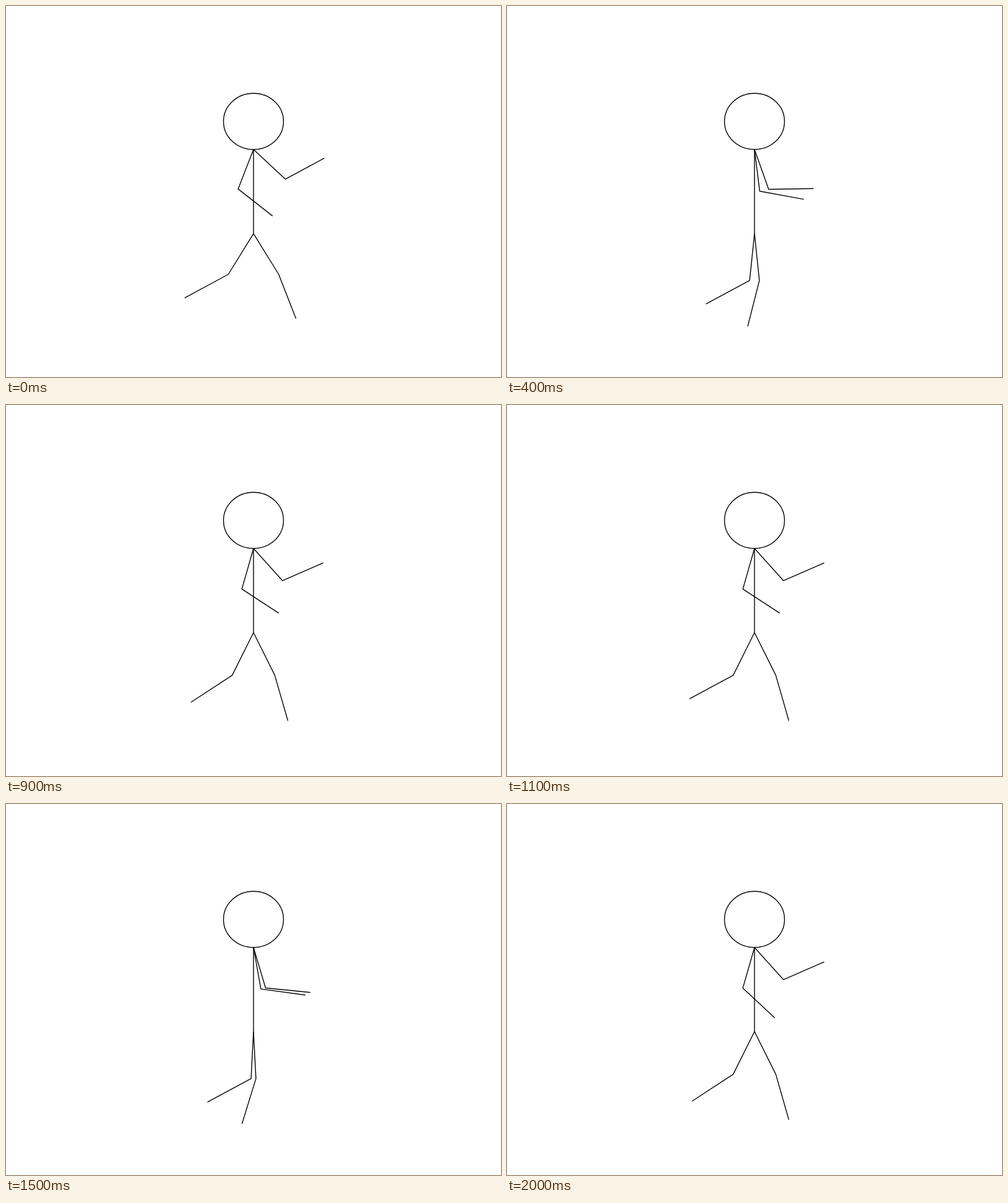
Recreate the animation shown at these times as an HTML page. Size 800 px wide and 600 px high, loop 2100 ms.

```html
<!DOCTYPE html>
<html lang="en">
<head>
<meta charset="utf-8">
<title>Running stick figure</title>
<style>
  html, body { margin: 0; width: 100%; height: 100%; overflow: hidden; background: #fff; }
  svg { display: block; width: 800px; height: 600px; }
  svg * {
    fill: none;
    stroke: #000;
    stroke-width: 1.4;
    stroke-linejoin: round;
    vector-effect: non-scaling-stroke;
  }
</style>
</head>
<body>
<svg viewBox="0 0 800 600">
  <g transform="translate(400 300) scale(.9697 .907)">
    <circle cy="-125" r="50"/>
    <path d="M0 -75V75"/>
    <polyline id="frontArm"/>
    <polyline id="backArm"/>
    <polyline id="frontLeg"/>
    <polyline id="backLeg"/>
  </g>
</svg>
<script>
const STEP_MS = 100;
const STRIDE = 9;
const LOOP = 21;
const SHOULDER = -75;
const HIP = 75;
const ARM = 75;
const LEG = 84;

const mix = (from, to, p) => from + (to - from) * p;

// Angles are in degrees: 0 points down, positive points forward.
function extend([x, y], degrees, length) {
  const a = degrees * Math.PI / 180;
  return [x + Math.sin(a) * length, y + Math.cos(a) * length];
}

function drawLimb(id, y, length, upper, lower) {
  const root = [0, y];
  const joint = extend(root, upper, length);
  const tip = extend(joint, lower, length);
  document.getElementById(id).setAttribute("points", [root, joint, tip].join(" "));
}

// Two strides per loop; front and back limbs trade roles at each contact.
function pose(step) {
  const k = step <= STRIDE ? step : Math.max(0, step - STRIDE - 2);
  const settle = step > STRIDE + 1 ? 5 : 0; // second stride starts past full reach
  const p = k / STRIDE;

  const arm = mix(45 - settle, -15, p);
  drawLimb("frontArm", SHOULDER, ARM, arm, mix(120 - settle, 55 - 2 * settle, p));
  drawLimb("backArm", SHOULDER, ARM, 25 - arm, mix(50 + settle, 115, p));

  // The trailing shin stays folded, then kicks forward over the last four steps.
  const thigh = mix(30 - settle, -25, p);
  const kick = (75 - settle) / 4;
  drawLimb("frontLeg", HIP, LEG, thigh, mix(20 - settle, -55, p));
  drawLimb("backLeg", HIP, LEG, -thigh, Math.max(-60, 15 - (STRIDE - k) * kick));
}

const start = performance.now();
function tick() {
  const elapsed = Math.max(0, performance.now() - start);
  pose(Math.floor(elapsed / STEP_MS) % LOOP);
  requestAnimationFrame(tick);
}
tick();
</script>
</body>
</html>
```
